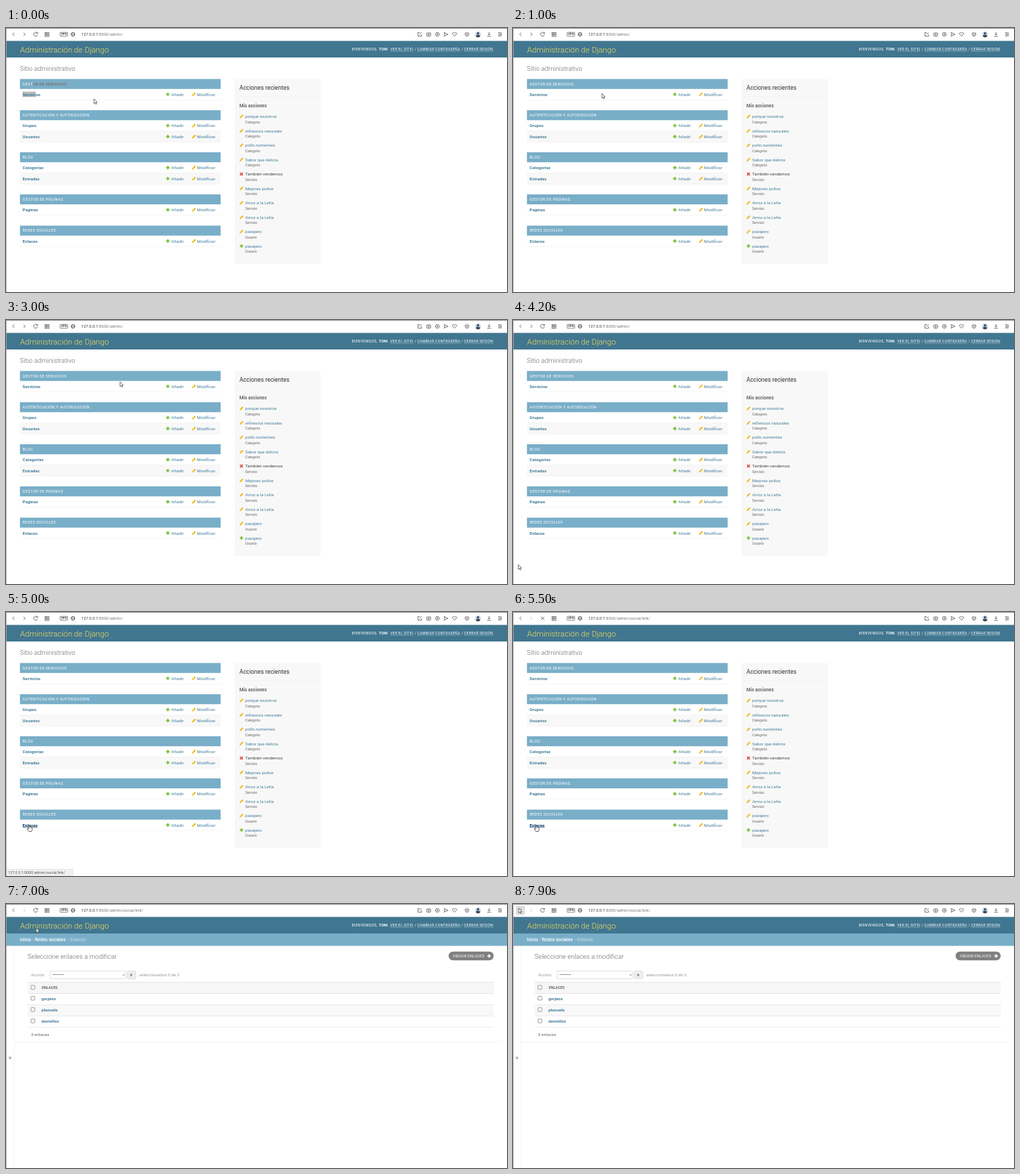
Recreate the animation shown at these times as an HTML page. Size 712x376 px, loop 8000 ms.

```html
<!DOCTYPE html>
<html lang="es">
<head>
<meta charset="utf-8">
<title>Administración</title>
<style>
  html, body { margin: 0; width: 100%; height: 100%; overflow: hidden; background: #fff; }
  svg { display: block; width: 712px; height: 376px; }
  text { font-family: Roboto, "Liberation Sans", sans-serif; white-space: pre; }
</style>
</head>
<body>
<svg id="stage" viewBox="0 0 712 376" xmlns="http://www.w3.org/2000/svg"></svg>
<script>
const LOOP = 8000, STEP = 100;
const C = { bar: '#417690', light: '#79aec8', link: '#447e9b', dim: '#5b80b2', grey: '#666',
  pale: '#f8f8f8', line: '#eaeaea', add: '#70bf2b', edit: '#efb80b', del: '#dd4646', icon: '#555' };
const stage = document.getElementById('stage');
let layer = stage;

function el(tag, attrs, parent = layer) {
  const node = document.createElementNS('http://www.w3.org/2000/svg', tag);
  for (const k in attrs) node.setAttribute(k, attrs[k]);
  return parent.appendChild(node);
}
function group(draw) {
  const outer = layer, g = el('g', {});
  layer = g;
  draw();
  layer = outer;
  return g;
}
const rect = (x, y, w, h, fill, more) => el('rect', { x, y, width: w, height: h, fill, ...more });
const path = (d, stroke, w = .8, more) => el('path', { d, fill: 'none', stroke, 'stroke-width': w, ...more });
const circle = (cx, cy, r, more) => el('circle', { cx, cy, r, fill: 'none', stroke: C.icon, 'stroke-width': .8, ...more });
// cy is the middle of the capitals
function text(x, cy, str, size, fill, more) {
  const t = el('text', { x, y: cy + size * .355, 'font-size': size, fill, ...more });
  t.textContent = str;
  return t;
}
const bold = { 'font-weight': 700 }, thin = { 'font-weight': 300 }, wide = { 'letter-spacing': .234 };

const plus = (x, y, color = C.add) => path(`M${x - 2.6} ${y}h5.2M${x} ${y - 2.6}v5.2`, color, 1.6);
const cross = (x, y) => path(`M${x - 2} ${y - 2}l4 4m0 -4l-4 4`, C.del, 1.5);
function pencil(x, y) {
  path(`M${x - 1.6} ${y + 1.6}L${x + 2.1} ${y - 2.1}`, C.edit, 2);
  path(`M${x - 2.8} ${y + 2.8}l.5 -1.9l1.4 1.4z`, 'none', 0, { fill: C.edit });
}

// ---- browser bar
rect(0, 0, 712, 376, '#fff');
const backGlow = rect(4, 2.5, 13, 13, '#dedede', { rx: 2 });
path('M11.8 6.6L9.4 9L11.8 11.4', C.icon);
const forward = path('M25 6.6L27.4 9L25 11.4', C.icon);
const reload = path('M44.6 7.6A2.8 2.8 0 1 0 44.8 9.6M44.9 5.8v2h-2', C.icon);
const stop = path('M39.8 6.8l4.6 4.6m0 -4.6l-4.6 4.6', C.icon);
for (const x of [55.6, 58.9]) for (const y of [6.5, 9.8]) rect(x, y, 2.2, 2.2, 'none', { stroke: C.icon, 'stroke-width': .7 });
rect(76.9, 6.2, 10.8, 5.6, '#fff', { rx: .8, stroke: C.icon, 'stroke-width': .7 });
text(78.2, 9, 'VPN', 4.1, '#444', bold);
circle(95.2, 9, 2.7);
path('M92.5 9h5.4M95.2 6.3c-2 1.8 -2 3.6 0 5.4c2 -1.8 2 -3.6 0 -5.4', C.icon, .6);
const url = text(107, 9.3, '', 5.75, '#333', { 'font-family': '"Open Sans", "Noto Sans", sans-serif' });
const host = el('tspan', {}, url), route = el('tspan', { fill: '#777' }, url);
host.textContent = '127.0.0.1';

path('M588 6.5h-2.6v5.3h5.2v-2.5M587.6 9.6l3 -3.2', C.icon);
rect(597.9, 7, 5.6, 4.6, 'none', { rx: .8, stroke: C.icon, 'stroke-width': .8 });
circle(600.7, 9.3, 1);
circle(613, 9, 2.7);
path('M612 8l2 2m0 -2l-2 2', C.icon, .7);
path('M622.6 6.4l5.6 2.6l-5.6 2.6l1 -2.6z', C.icon);
path('M637.4 11.8l-2.6 -2.7c-1.5 -2.1 1.3 -3.6 2.6 -1.6c1.3 -2 4.1 -.5 2.6 1.6z', C.icon);
path('M655.2 6.2l2.5 1.3v3l-2.5 1.4l-2.5 -1.4v-3zM652.7 7.5l2.5 1.4l2.5 -1.4M655.2 8.9v3', C.icon, .7);
circle(670.8, 9, 4.3, { fill: '#cfdbe8', stroke: 'none' });
circle(670.8, 7.6, 1.7, { fill: '#39485c', stroke: 'none' });
path('M667.7 12c.4 -3.2 5.8 -3.2 6.2 0c-1.6 1.7 -4.6 1.7 -6.2 0z', 'none', 0, { fill: '#39485c' });
path('M686.5 6v4m-1.7 -1.6l1.7 1.7l1.7 -1.7M683.7 11.8h5.6', C.icon);
path('M699.4 6.9h5.4M699.4 9h5.4M699.4 11.1h5.4', C.icon, .7);
path('M701 6.1v1.6M703.3 8.2v1.6M701.4 10.3v1.6', C.icon, .9);

// ---- site header
rect(0, 18.4, 712, 23.6, C.bar);
text(20, 30.8, 'Administración de Django', 11.24, '#f5dd5d', thin);
function tool(x, str, more) {
  return text(x, 30, str, 5.15, '#fff', { ...wide, ...more });
}
tool(491.6, 'BIENVENIDOS,');
tool(529.8, 'TONI', bold);
tool(543, '.');
for (const [x, str, w] of [[546, 'VER EL SITIO', 33], [584.6, 'CAMBIAR CONTRASEÑA', 61.4], [651, 'CERRAR SESIÓN', 42]]) {
  tool(x, str);
  path(`M${x} 33.2h${w}`, '#a9c3d0', .5);
}
tool(580.8, '/');
tool(647.3, '/');

// ---- index page
let selection, picked, enlaces;
const index = group(() => {
  text(19.8, 57.8, 'Sitio administrativo', 9.37, C.grey, thin);
  const modules = [
    [72.6, 'GESTOR DE SERVICIOS', 'Servicios'],
    [117.1, 'AUTENTICACIÓN Y AUTORIZACIÓN', 'Grupos', 'Usuarios'],
    [177, 'BLOG', 'Categorías', 'Entradas'],
    [237, 'GESTOR DE PÁGINAS', 'Paginas'],
    [281.5, 'REDES SOCIALES', 'Enlaces']
  ];
  for (const [top, title, ...rows] of modules) {
    rect(19.8, top, 285.2, 14.2, C.light);
    const caption = text(23.6, top + 7, '', 5.62, '#fff', wide);
    if (top < 80) {
      el('tspan', {}, caption).textContent = title.slice(0, 4);
      selection = el('tspan', {}, caption);
      selection.textContent = title.slice(4);
    } else caption.textContent = title;
    rows.forEach((name, i) => {
      const y = top + 21.9 + i * 15.6;
      if (i) rect(19.8, y - 7.4, 285.2, 15, C.pale);
      rect(19.8, y + 7.4, 285.2, .5, C.line);
      if (top < 80) picked = rect(23.6, y - 4, 18.6, 7.8, '#b9bcbe');
      const label = text(23.6, y, name, 6.1, C.link, bold);
      if (name === 'Enlaces') enlaces = label;
      plus(230, y);
      text(234.7, y, 'Añadir', 6.2, C.link);
      pencil(267, y);
      text(271.3, y, 'Modificar', 6.25, C.link);
    });
  }

  rect(325, 72.6, 122, 263.4, C.pale);
  text(331.7, 85.4, 'Acciones recientes', 8.43, '#333');
  rect(325, 97.4, 122, .5, C.line);
  text(331.7, 110.2, 'Mis acciones', 6.55, C.grey, bold);
  const actions = [
    ['porque nosotros', 'Categoria'], ['refrescos naturales', 'Categoria'],
    ['pollo nutrientes', 'Categoria'], ['Sabor que delicia', 'Categoria'],
    ['También vendemos', 'Servicio', cross], ['Mejores pollos', 'Servicio'],
    ['Arroz a la Leña', 'Servicio'], ['Arroz a la Leña', 'Servicio'],
    ['pasajero', 'Usuario'], ['pasajero', 'Usuario', plus]
  ];
  actions.forEach(([name, kind, icon = pencil], i) => {
    const y = 126 + i * 20.5;
    icon(334.6, y);
    text(340, y, name, 6.13, icon === cross ? '#444' : C.link);
    text(340, y + 7.8, kind, 4.85, C.grey);
  });
});

// ---- list page
let counter;
const list = group(() => {
  rect(0, 42, 712, 17.6, C.light);
  const mid = { 'font-weight': 500 };
  text(19.8, 51, 'Inicio', 6.5, '#fff', mid);
  text(37.3, 51, '›', 6.5, '#c4dce8');
  text(41, 51, 'Redes sociales', 6.5, '#fff', mid);
  text(87, 51, '›', 6.5, '#c4dce8');
  text(91, 51, 'Enlaces', 6.5, '#c4dce8');
  rect(11.2, 59.6, .5, 317, C.line);
  text(3.4, 218.4, '»', 9.37, C.bar);

  text(30.8, 74.7, 'Seleccione enlaces a modificar', 9.37, C.grey, thin);
  rect(629, 67.8, 64, 12.4, '#808080', { rx: 6.2 });
  text(634.8, 74, 'AÑADIR ENLACES', 5.15, '#fff', wide);
  plus(686.6, 74, '#fff');

  text(35.4, 100.8, 'Acción:', 6.1, '#999');
  const box = { stroke: '#ccc', 'stroke-width': .6, rx: 1.5 };
  rect(62.3, 95.4, 107.8, 11, '#fff', box);
  text(66, 101, '---------', 6.55, '#333');
  path('M165.8 100.4l1.3 1.3l1.3 -1.3', '#333', .7);
  rect(172.3, 95.4, 12, 11, '#efefef', box);
  text(176.3, 100.8, 'Ir', 6.1, '#333');
  counter = text(189.2, 100.8, 'seleccionados 0 de 3', 6.1, '#999');

  rect(30.8, 111.3, 662.4, 16, '#f6f6f6');
  rect(30.8, 143.2, 662.4, 16, C.pale);
  for (const y of [111.2, 127.1, 143.1, 159.2, 175.3]) rect(30.8, y, 662.4, .6, y < 130 ? '#dcdcdc' : '#e2e2e2');
  rect(12, 196.3, 692, .5, C.line);
  for (const y of [118.7, 134.2, 150.4, 166.5])
    rect(35.5, y - 2.7, 5.4, 5.4, '#fff', { rx: .7, stroke: '#767676', 'stroke-width': .7 });
  text(51, 119.2, 'ENLACES', 5.15, C.grey, bold);
  ['gorjeos', 'plazuela', 'destellos'].forEach((name, i) => text(50.3, 134.6 + i * 16.2, name, 6.1, C.link, bold));
  text(35.4, 185.8, '3 enlaces', 6.1, C.grey);
});

const status = group(() => {
  rect(0, 366.5, 95, 9.5, '#f1f1f1', { stroke: '#d0d0d0', 'stroke-width': .5 });
  text(3, 371.4, '127.0.0.1:8000/admin/social/link/', 5.3, '#555');
});

// window edges
rect(0, 0, 712, .8, '#777');
rect(0, 0, .8, 376, '#aaa');

// ---- pointers, tip at 0,0
const arrow = group(() => path('M0 0V6.6L1.6 5.2L2.6 7.6L3.7 7.1L2.7 4.8H4.7Z', '#222', .6, { fill: '#fff', 'stroke-linejoin': 'round' }));
const hand = group(() => path(
  'M-.8 .7Q0 -.5 .8 .7V3.2Q1.6 2.7 2 3.4Q2.8 3 3.1 3.7Q4.1 3.4 4.2 4.5V6.2Q4.1 7.6 3.3 9H-.6Q-1.5 7.2 -3 5.4Q-2.6 4.4 -1.6 5.1L-.8 5.8Z',
  '#222', .65, { fill: '#fff', 'stroke-linejoin': 'round' }));

const trail = [ // ms, x, y
  [900, 125, 101], [1400, 138, 27], [1500, 138, 27], [1700, 172, 39.5], [2100, 162, 88],
  [3300, 162, 88], [3900, 22, 318], [4200, 7.5, 348.5], [4300, 16, 334], [4400, 33, 308],
  [4600, 33, 308], [4700, 33.5, 304], [4900, 33, 303.5], [6100, 33, 303.5], [6800, 36, 29],
  [6900, 36, 29], [7300, 80, 63], [7800, 8, 6]
];
function place(t) {
  const i = trail.findIndex(p => p[0] > t);
  if (i < 0) return trail[trail.length - 1].slice(1);
  if (!i) return trail[0].slice(1);
  const [t0, x0, y0] = trail[i - 1], [t1, x1, y1] = trail[i];
  const k = (t - t0) / (t1 - t0), e = k * k * (3 - 2 * k);
  return [x0 + (x1 - x0) * e, y0 + (y1 - y0) * e];
}
const show = (node, on) => node.setAttribute('visibility', on ? 'visible' : 'hidden');
const within = (t, a, b) => t >= a && t < b;

function render(t) {
  const listed = t >= 5700, hover = within(t, 4900, 5700);
  index.style.display = listed ? 'none' : '';
  list.style.display = listed ? '' : 'none';
  show(counter, t >= 5800);
  show(picked, t < 500);
  selection.setAttribute('fill', t < 500 ? '#7d5a50' : '#fff');
  enlaces.setAttribute('fill', hover ? '#036' : C.link);
  enlaces.setAttribute('text-decoration', hover ? 'underline' : 'none');
  show(status, within(t, 4900, 5500));
  const loading = within(t, 5300, 5800);
  show(stop, loading);
  show(reload, !loading);
  forward.setAttribute('stroke', t >= 5500 ? '#c4c4c4' : C.icon);
  route.textContent = ':8000/admin/' + (t >= 5500 ? 'social/link/' : '');
  show(backGlow, t >= 7800);

  const [x, y] = place(t);
  const pointing = within(t, 1700, 1800) || within(t, 4700, 6200);
  show(hand, pointing);
  show(arrow, !pointing);
  (pointing ? hand : arrow).setAttribute('transform', `translate(${x} ${y})`);
}

function tick() {
  render(Math.floor(performance.now() % LOOP / STEP) * STEP);
  requestAnimationFrame(tick);
}
tick();
</script>
</body>
</html>
```
